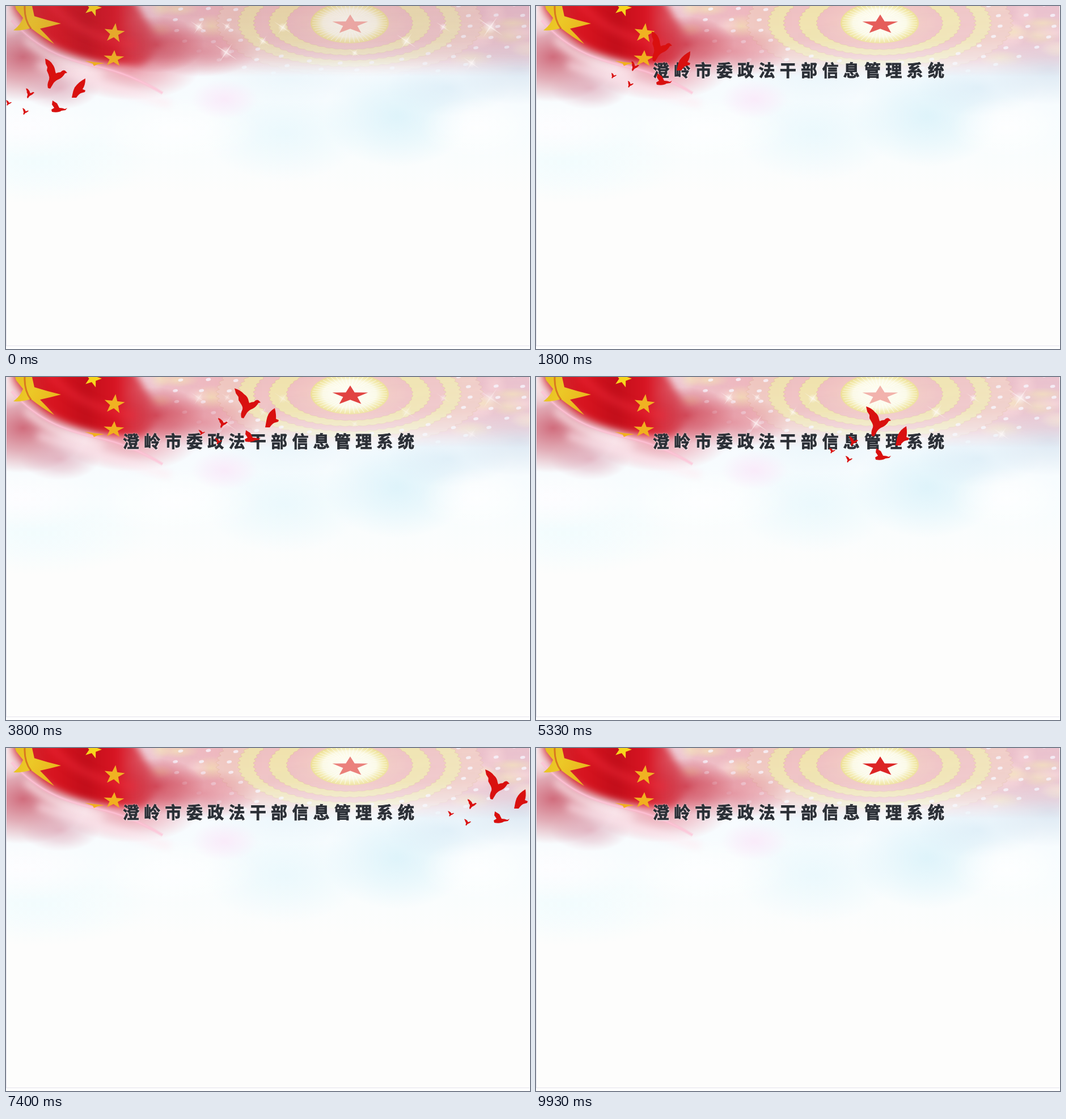
These frames come from a looping animation (924 px wide and 606 px high, 9.99 s). An HTML page with a canvas:

```html
<!DOCTYPE html>
<html lang="zh-CN">
<head>
<meta charset="utf-8">
<title>信息管理系统</title>
<style>
html, body { margin: 0; width: 100%; height: 100%; overflow: hidden; background: #fff; }
canvas, h1 { position: absolute; left: 0; top: 0; }
h1 {
  left: 206px; top: 92px; margin: 0; white-space: nowrap;
  font: 700 29px/40px "Noto Sans CJK SC", "Noto Sans CJK", sans-serif;
  letter-spacing: 8.3px; color: #2b2f36; -webkit-text-stroke: 0.8px #2b2f36;
  text-shadow: 0 0 3px #fff, 1px 1px 2px #ffffffcc;
}
</style>
</head>
<body>
<canvas id="back" width="924" height="606"></canvas>
<h1 id="title">澄岭市委政法干部信息管理系统</h1>
<canvas id="front" width="924" height="606"></canvas>
<script>
const W = 924, H = 606, LOOP = 9990, TAU = Math.PI * 2;
const BEAT = 4 / 3;
const back = document.getElementById('back').getContext('2d');
const front = document.getElementById('front').getContext('2d');
const title = document.getElementById('title');
const clamp = (v, lo = 0, hi = 1) => Math.min(hi, Math.max(lo, v));

let seed = 11;
const random = () => (seed = seed * 16807 % 2147483647) / 2147483647;

function layer() {
  const canvas = document.createElement('canvas');
  canvas.width = W;
  canvas.height = H;
  return canvas.getContext('2d');
}

function blob(c, x, y, rx, ry, rgb, alpha) {
  const g = c.createRadialGradient(0, 0, 0, 0, 0, 1);
  g.addColorStop(0, `rgba(${rgb},${alpha})`);
  g.addColorStop(0.5, `rgba(${rgb},${alpha * 0.55})`);
  g.addColorStop(1, `rgba(${rgb},0)`);
  c.save();
  c.translate(x, y);
  c.scale(rx, ry);
  c.fillStyle = g;
  c.fillRect(-1, -1, 2, 2);
  c.restore();
}

function gradient(c, x, y, stops) {
  const g = c.createLinearGradient(0, 0, x, y);
  stops.forEach(([at, color]) => g.addColorStop(at, color));
  return g;
}

function stroke(c, path, width, color) {
  c.lineWidth = width;
  c.strokeStyle = color;
  c.stroke(new Path2D(path));
}

function star(c, x, y, rx, ry, color, turn = 0) {
  c.beginPath();
  for (let i = 0; i < 10; i++) {
    const a = turn - Math.PI / 2 + i * Math.PI / 5, k = i % 2 ? 0.4 : 1;
    c.lineTo(x + rx * k * Math.cos(a), y + ry * k * Math.sin(a));
  }
  c.closePath();
  c.fillStyle = color;
  c.fill();
}

function scallop(c, rx, ry, color, lobes) {
  c.beginPath();
  for (let i = 0; i <= 720; i++) {
    const a = i / 720 * TAU;
    const k = 1 + 0.025 * Math.abs(Math.sin(a * lobes / 2));
    c.lineTo(606 + rx * k * Math.cos(a), 30 + ry * k * Math.sin(a));
  }
  c.fillStyle = color;
  c.fill();
  c.strokeStyle = 'rgba(214,170,130,.35)';
  c.stroke();
}

function paintSky(c) {
  c.fillStyle = '#fdfdfc';
  c.fillRect(0, 0, 923, 601);
  c.fillStyle = gradient(c, 0, 330, [[0.25, '#f6fafe'], [0.7, '#f8fdfe'], [1, '#fdfdfc']]);
  c.fillRect(0, 0, 923, 330);
  blob(c, 60, 275, 200, 75, '240,252,254', 0.8);
  blob(c, 490, 225, 140, 85, '230,247,252', 0.7);
  blob(c, 690, 195, 130, 90, '212,240,249', 0.7);
  blob(c, 780, 145, 110, 50, '212,233,245', 0.6);
  blob(c, 905, 110, 110, 65, '205,222,236', 0.65);
  blob(c, 500, 130, 150, 40, '230,244,250', 0.6);
  blob(c, 830, 215, 100, 55, '255,255,255', 0.8);
  blob(c, 300, 220, 150, 60, '255,255,255', 0.8);
}

function paintHall(c) {
  const hall = layer();
  hall.fillStyle = gradient(hall, 924, 0, [[0.2, '#e9a6b4'], [0.45, '#eeb9be'], [0.75, '#ecb4bc'], [1, '#e6b6c4']]);
  hall.fillRect(0, 0, 923, 150);
  for (let i = 0; i < 46; i++) {
    const x = 270 + random() * 650, y = random() * 95;
    blob(hall, x, y, 18 + random() * 26, 12 + random() * 12, i % 3 ? '249,207,208' : '243,224,168', 0.65);
  }
  scallop(hall, 230, 92, '#efc6bf', 70);
  scallop(hall, 193, 76, '#efe0ae', 64);
  scallop(hall, 166, 65, '#eebec0', 60);
  scallop(hall, 140, 56, '#efe1aa', 52);
  scallop(hall, 109, 46, '#eebcbe', 44);
  blob(hall, 606, 30, 105, 48, '250,225,190', 0.5);

  hall.save();
  hall.translate(606, 30);
  hall.scale(69, 36);
  const disc = hall.createRadialGradient(0, 0, 0.2, 0, 0, 1);
  [[0, '#fffef4'], [0.6, '#fbf8e0'], [0.82, '#f3e9a8'], [1, '#ecdc8c']].forEach(s => disc.addColorStop(...s));
  hall.beginPath();
  hall.arc(0, 0, 1, 0, TAU);
  hall.fillStyle = disc;
  hall.fill();
  hall.strokeStyle = 'rgba(255,255,255,.5)';
  hall.lineWidth = 0.025;
  for (let i = 0; i < 48; i++) {
    const a = i / 48 * TAU;
    hall.beginPath();
    hall.moveTo(0.45 * Math.cos(a), 0.45 * Math.sin(a));
    hall.lineTo(0.96 * Math.cos(a), 0.96 * Math.sin(a));
    hall.stroke();
  }
  hall.restore();

  for (const [rx, ry, count] of [[213, 71, 24], [262, 83, 26], [308, 98, 32]]) {
    for (let i = 0; i < count; i++) {
      const a = (i + 0.3) / count * TAU;
      hall.beginPath();
      hall.ellipse(606 + rx * Math.cos(a), 30 + ry * Math.sin(a), 4.5, 2.6, -0.2, 0, TAU);
      hall.fillStyle = 'rgba(248,244,252,.8)';
      hall.fill();
    }
  }
  hall.globalCompositeOperation = 'destination-in';
  hall.fillStyle = gradient(hall, 0, 125, [[0, '#000'], [0.48, '#000000e8'], [0.72, '#00000098'], [0.87, '#0000003a'], [1, '#0000']]);
  hall.fillRect(0, 0, W, H);
  hall.fillStyle = gradient(hall, W, 0, [[0.2, '#0000'], [0.3, '#000000d0'], [0.42, '#000'], [1, '#000000d0']]);
  hall.fillRect(0, 0, W, H);
  c.drawImage(hall.canvas, 0, 0);
  blob(c, 385, 165, 60, 35, '250,228,248', 0.7);
}

function paintFlag(c) {
  blob(c, 30, 90, 115, 80, '196,62,82', 0.75);
  blob(c, 95, 145, 70, 38, '214,140,160', 0.55);
  blob(c, 220, 115, 120, 52, '232,120,138', 0.65);
  blob(c, 345, 80, 100, 45, '218,110,126', 0.6);
  blob(c, 265, 68, 85, 50, '200,44,62', 0.75);

  c.save();
  c.filter = 'blur(7px)';
  c.fillStyle = gradient(c, 280, 0, [[0, '#cc3038'], [0.3, '#d8141f'], [0.5, '#c20e1a'], [0.7, '#d91523'], [0.88, '#d02636b0'], [1, '#d0384800']]);
  c.fill(new Path2D('M10 -20H222Q245 25 272 55Q270 92 235 106C170 106 105 90 66 60Q38 38 10 14Z'));
  c.lineCap = 'round';
  stroke(c, 'M78 -5Q120 50 225 68', 12, 'rgba(240,45,60,.5)');
  stroke(c, 'M38 62Q90 106 165 122', 13, 'rgba(255,235,240,.7)');
  stroke(c, 'M60 104Q130 128 285 172', 12, 'rgba(255,232,240,.65)');
  c.restore();
  blob(c, 0, 22, 36, 36, '250,222,224', 0.75);

  for (const [width, color] of [[6, 'rgba(255,180,205,.35)'], [2, 'rgba(255,196,216,.75)']]) {
    stroke(c, 'M10 25C60 82 115 97 165 108Q220 120 276 154', width, color);
  }

  c.fillStyle = gradient(c, 97, 60, [[0, '#e4bc1c'], [0.45, '#ecc827'], [1, '#e9ae1a']]);
  c.fill(new Path2D('M30 0H46L50 18Q72 25 97 31Q78 36 60 40Q73 53 85 67Q64 55 44 39Q29 44 13 43Q26 33 30 21L18 6L16 0Z'));
  stroke(c, 'M33 0Q32 24 44 40', 3, 'rgba(205,70,30,.6)');
  star(c, 153, 3, 16, 16, '#f7d51d', 0.3);
  star(c, 191, 48, 19, 18, '#f0b222', 0.12);
  star(c, 190, 93, 19, 15, '#f1b01f', 0.06);
  c.fill(new Path2D('M139 97L155 99L174 101L162 103L155 106L153 102Z'));

  blob(c, 30, 215, 150, 55, '255,253,255', 0.8);
}

function paintFrame(c) {
  c.fillStyle = '#fff';
  c.fillRect(923, 0, 1, H);
  c.fillRect(0, 601, W, 5);
  c.fillStyle = '#e4e2ec';
  c.fillRect(0, 0, 1, 601);
  c.fillRect(0, 600, 923, 1);
}

// Flight: seconds, x and y offset of the flock, wing sweep
const flight = [
  [0, 0, 0, 0], [1.8, 132, -48, -3], [3, 247, -70, 4], [3.8, 341, -73, 7],
  [5.333, 518, -41, 5], [6.2, 617, -27, 4], [6.6, 669, -16, 4],
  [7.067, 733, -30, 4], [7.4, 780, -55, 4], [8.6, 950, -95, 0]
];

function slope(i, k) {
  const a = flight[Math.max(0, i - 1)], b = flight[Math.min(flight.length - 1, i + 1)];
  return (b[k] - a[k]) / (b[0] - a[0]);
}

function flightAt(t) {
  const i = flight.findIndex((p, n) => n < flight.length - 1 && t < flight[n + 1][0]);
  if (i < 0) return null;
  const a = flight[i], b = flight[i + 1], d = b[0] - a[0], u = (t - a[0]) / d, v = 1 - u;
  return [1, 2, 3].map(k =>
    a[k] * v * v * (1 + 2 * u) + b[k] * u * u * (3 - 2 * u) +
    d * u * v * (slope(i, k) * v - slope(i + 1, k) * u));
}

const dove = w => new Path2D(`M${1 - w} 1Q${10 - w * 0.8} 4 ${14 - w * 0.5} 11Q18 16 19 24L20 27Q24 25 28 25
  Q32 20 36 22L40 26L36 27Q32 34 26 37Q20 39 16 44L10 54L6 53Q4 46 8 38Q9 34 ${7 - w * 0.2} 29
  L${4 - w * 0.4} 22L${5 - w * 0.6} 16L${2 - w * 0.8} 10Z`);
const glider = w => new Path2D(`M${72 - w} 36Q${72 - w * 0.6} 48 67 55L72 57L71 60L64 62Q60 64 56 70L48 70L49 65
  Q50 58 ${53 - w * 0.2} 52Q${60 - w * 0.8} 42 ${72 - w} 36Z`);
const swooper = new Path2D('M14 75L22 80L26 88Q32 88 36 90L40 88L37 92L30 93Q24 97 13 95L12 91L17 88L13 82Z');

function drawBirds(c, t) {
  const pose = flightAt(t);
  if (!pose) return;
  const [x, y, sweep] = pose;
  c.save();
  c.translate(68 + x, 92 + y);
  c.fillStyle = '#d9100f';
  const body = dove(sweep);
  c.fill(body);
  c.fill(glider(Math.max(0, sweep)));
  c.fill(swooper);
  for (const [dx, dy, sx, sy] of [[-33, 53, 0.38, 0.33], [-39, 88, 0.28, 0.22], [-68, 74, 0.26, 0.18]]) {
    c.save();
    c.translate(dx, dy);
    c.scale(sx, sy);
    c.fill(body);
    c.restore();
  }
  c.restore();
}

// The star pulses every two beats and stays lit after its last rise.
function starGlow(t) {
  if (t > 7 * BEAT) return 0.98;
  return 0.34 + 0.53 * (1 - Math.cos(t / (2 * BEAT) * TAU)) / 2;
}

const sparkles = [
  [340, 37, 18], [390, 36, 13], [388, 82, 24], [453, 62, 15], [488, 38, 19],
  [615, 83, 12], [706, 62, 21], [771, 37, 15], [821, 101, 18], [854, 37, 27]
];

function drawSparkles(c, t) {
  const alpha = t < 6.5 * BEAT ? Math.max(0, Math.cos(t / BEAT * TAU)) : 0;
  if (!alpha) return;
  c.save();
  c.globalAlpha = alpha * 0.65;
  for (const [x, y, r] of sparkles) {
    blob(c, x, y, r * 0.45, r * 0.45, '255,255,255', 0.9);
    c.beginPath();
    for (let i = 0; i < 8; i++) {
      const a = 0.6 + i * TAU / 8, k = i % 2 ? r * 0.07 : i % 4 ? r * 0.8 : r;
      c.lineTo(x + k * Math.cos(a), y + k * Math.sin(a));
    }
    c.fillStyle = 'rgba(255,250,248,.8)';
    c.fill();
  }
  c.restore();
}

const dusk = gradient(front, 0, 118, [[0, 'rgba(150,95,115,.13)'], [0.7, 'rgba(160,110,130,.1)'], [1, 'rgba(170,130,150,0)']]);

function draw(t) {
  const intro = clamp(t / BEAT);
  front.clearRect(0, 0, W, H);
  front.globalAlpha = 1 - intro;
  front.fillStyle = dusk;
  front.fillRect(0, 0, 923, 118);
  front.globalAlpha = starGlow(t);
  star(front, 607, 33, 33, 18, '#dc2020');
  front.globalAlpha = 1;
  drawSparkles(front, t);
  drawBirds(front, t);
  title.style.opacity = intro;
}

paintSky(back);
paintHall(back);
paintFlag(back);
paintFrame(back);

const start = performance.now();
function tick() {
  const ms = (performance.now() - start) % LOOP;
  draw(Math.floor(ms * 0.015 + 0.06) / 15);
  requestAnimationFrame(tick);
}
tick();
</script>
</body>
</html>
```
